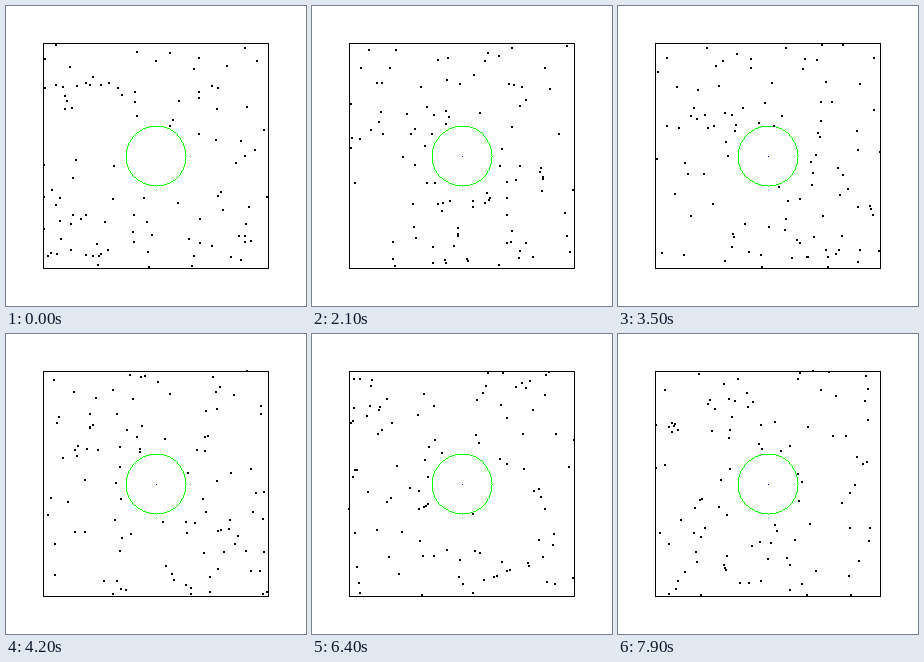
Recreate the animation shown at these times as a matplotlib script. Size 300 px wide and 300 px high, loop 8 s.

```python
import numpy as np
import matplotlib.pyplot as plt
from matplotlib.animation import FuncAnimation
from matplotlib.collections import PolyCollection
from matplotlib.patches import Rectangle

SIZE, DPI = 300, 100
FRAMES, INTERVAL = 80, 100
LOW, HIGH = 37.5, 262.5      # walls of the box
CENTER, RADIUS = 150, 30     # fixed disk
COUNT, SPEED, SUBSTEPS = 100, 3.2, 8


def squares(corners, side):
    """Axis-aligned squares from their top-left corners."""
    unit = np.array([(0, 0), (1, 0), (1, 1), (0, 1)]) * side
    return np.asarray(corners)[:, None, :] + unit


def ring(radius):
    """Pixels crossed by a circle, one per column or row of each arc."""
    reach = int(radius * 0.7072)
    a = np.arange(-reach, reach + 1)
    b = np.sqrt(radius ** 2 - a ** 2)
    arcs = [(a, b), (a, -b), (b, a), (-b, a)]
    points = np.hstack([np.array(arc) for arc in arcs]).T
    return np.floor(CENTER + points)


def scatter_start(rng):
    """Uniform positions in the box, outside the disk."""
    points = rng.uniform(LOW, HIGH, (4 * COUNT, 2))
    outside = np.hypot(*(points - CENTER).T) > RADIUS + 1
    return points[outside][:COUNT]


def bounce_walls(pos, vel):
    low, high = pos < LOW, pos > HIGH
    pos[low] = 2 * LOW - pos[low]
    pos[high] = 2 * HIGH - pos[high]
    vel[low | high] *= -1


def bounce_disk(pos, vel):
    offset = pos - CENTER
    dist = np.hypot(*offset.T)
    hit = dist < RADIUS
    normal = offset[hit] / dist[hit, None]
    inward = np.minimum((vel[hit] * normal).sum(axis=1), 0)
    vel[hit] -= 2 * inward[:, None] * normal
    pos[hit] = CENTER + normal * (2 * RADIUS - dist[hit])[:, None]


def simulate():
    rng = np.random.default_rng(12)
    pos = scatter_start(rng)
    vel = rng.normal(0, SPEED, (COUNT, 2))
    path = [pos.copy()]
    for _ in range(FRAMES - 1):
        for _ in range(SUBSTEPS):
            pos += vel / SUBSTEPS
            bounce_walls(pos, vel)
            bounce_disk(pos, vel)
        path.append(pos.copy())
    return np.floor(path) - 1


path = simulate()

fig = plt.figure(figsize=(SIZE / DPI, SIZE / DPI), dpi=DPI, facecolor="white")
ax = fig.add_axes([0, 0, 1, 1])
ax.set(xlim=(0, SIZE), ylim=(SIZE, 0))
ax.axis("off")


def add_squares(corners, side, color, zorder):
    return ax.add_collection(
        PolyCollection(squares(corners, side), facecolors=color, edgecolors="none",
                       linewidths=0, antialiaseds=False, zorder=zorder),
        autolim=False)


ax.add_patch(Rectangle((LOW, LOW), HIGH - LOW, HIGH - LOW, fill=False,
                       edgecolor="black", linewidth=72 / DPI,
                       antialiased=False, snap=False))
add_squares(ring(RADIUS), 1, "#00ff00", 2)
middle = add_squares([(CENTER, CENTER)], 1, "#0000ff", 3)
dots = add_squares(path[0], 2, "black", 4)


def update(i):
    dots.set_verts(squares(path[i], 2))
    middle.set_visible(i > 0)
    return dots, middle


anim = FuncAnimation(fig, update, frames=FRAMES, interval=INTERVAL,
                     init_func=lambda: update(0), repeat=True, repeat_delay=0)
plt.show()
```
